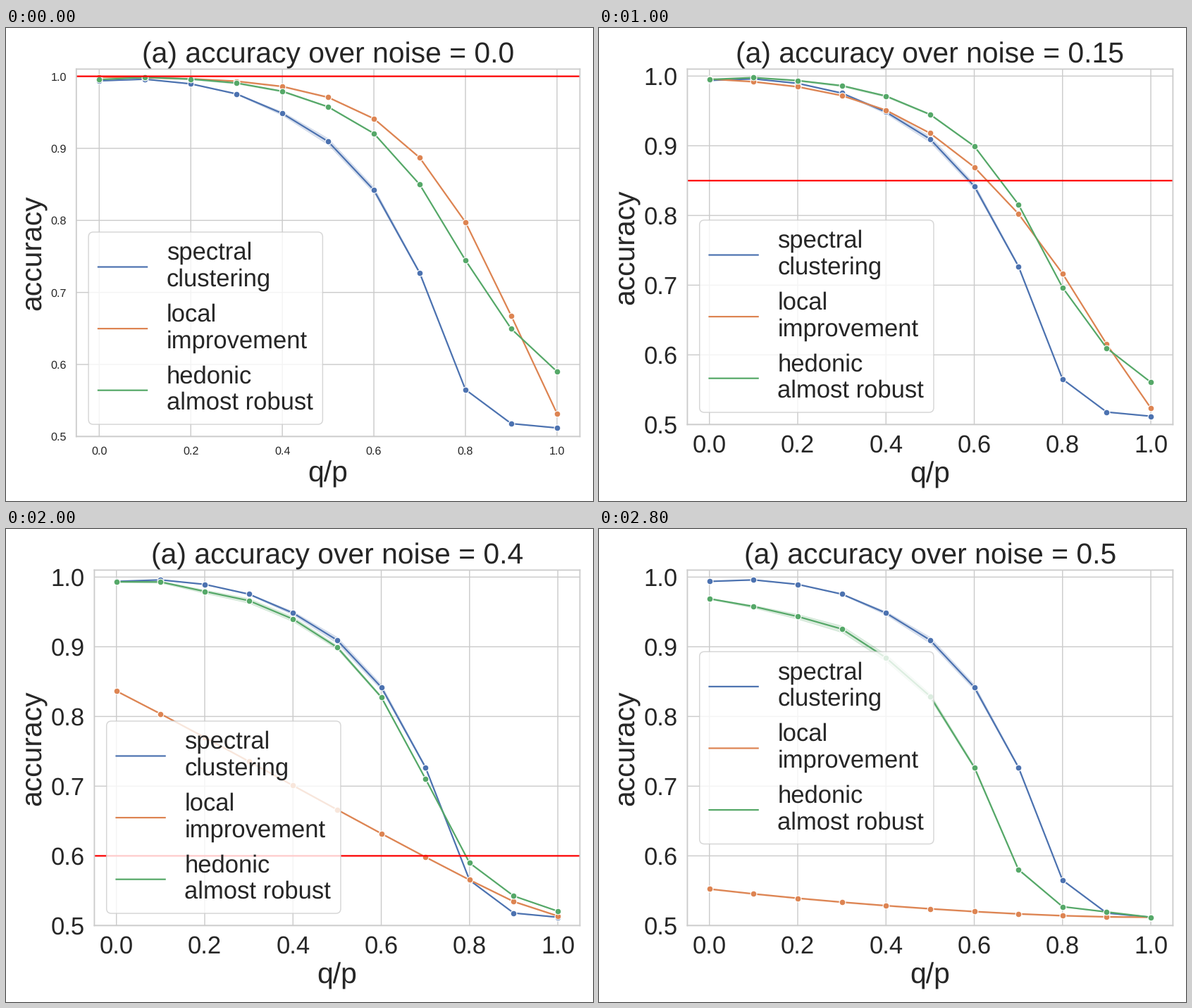
Animation, 833 px wide and 672 px high, one loop 3000 ms. Source, as a matplotlib script:

```python
import math

import numpy as np
import matplotlib.pyplot as plt
from matplotlib.animation import FuncAnimation
from matplotlib.lines import Line2D

W, H, DPI = 833, 672, 64
UNIT = 1.465 * 72 / DPI          # one design point in figure points
BIG, MEDIUM, SMALL = 27.9 * UNIT, 23.6 * UNIT, 11 * UNIT
BLUE, ORANGE, GREEN = "#4c72b0", "#dd8452", "#55a868"
INK, GREY = "0.15", "0.8"

NOISE = [0.0, 0.01, 0.025, *np.linspace(0.05, 0.45, 9), 0.475, 0.49, 0.5]
SHORT_LABELS_AT = 0.475
RATIO = np.linspace(0, 1, 11)

LONG = ["spectral\nclustering", "local\nimprovement", "hedonic\nalmost robust"]
SHORT = ["algorithm", "spectral", "local improv", "hedonic"]

plt.rcParams.update({
    "font.family": "Liberation Sans",
    "text.hinting": "none",
    "text.color": INK,
    "path.snap": False,
    "axes.labelcolor": INK,
    "axes.edgecolor": GREY,
    "axes.linewidth": 1.25 * UNIT,
    "axes.axisbelow": True,
    "axes.labelpad": 4 * UNIT,
    "axes.titlepad": 6 * UNIT,
    "grid.color": GREY,
    "grid.linewidth": UNIT,
    "patch.linewidth": UNIT,
})


# Accuracies are modelled as normal probabilities of a score z(q/p, noise).
@np.vectorize
def normal_cdf(z):
    return 0.5 * (1 + math.erf(z / math.sqrt(2)))


def profile(*points):
    """Score along q/p, linear between a few (q/p, z) points."""
    return np.interp(RATIO, *zip(*points))


SPECTRAL = profile((0, 2.5), (.1, 2.65), (.4, 1.63), (.5, 1.338), (.6, 1.003),
                   (.7, .604), (.8, .164), (.9, .045), (1, .03))
HEDONIC_CLEAN = profile((0, 2.61), (.1, 2.98), (.6, 1.41), (.7, 1.036),
                        (.8, .658), (.9, .384), (1, .228))
HEDONIC_NOISY = profile((0, 1.866), (.3, 1.443), (.5, .95), (.6, .604),
                        (.7, .203), (.8, .068), (1, .03))
FADE = profile((0, .1), (.2, .5), (.7, .5), (1, 1.34))


def local_score(signal):
    """Falls to zero at q/p = 1, bending more the weaker the signal."""
    peak = ((signal * (5.35 - 2.26 * signal)) ** 4 + 0.1285 ** 4) ** 0.25
    bend = 0.5 - 0.85 * signal - 0.15 * signal ** 4
    floor = 0.03 + 0.05 * signal ** 1.5
    return np.hypot(peak * (1 - RATIO) * (1 + RATIO) ** -bend, floor)


def hedonic_score(signal):
    weight = signal ** FADE * math.tanh(10 * signal) ** 1.5
    return HEDONIC_NOISY + weight * (HEDONIC_CLEAN - HEDONIC_NOISY)


def bell(center, width):
    return np.exp(-((RATIO - center) / width) ** 2)


def curve(score, color, spread):
    y = normal_cdf(score)
    ax.fill_between(RATIO, y - spread, y + spread, color=color, alpha=0.2,
                    linewidth=UNIT * 0.5)
    ax.plot(RATIO, y, color=color, lw=1.5 * UNIT, marker="o", ms=6 * UNIT,
            mec="white", mew=0.75 * UNIT)


def place_axes(left, bottom):
    top, right = 58.4, 814.4
    ax.set_position([left / W, 1 - bottom / H, (right - left) / W, (bottom - top) / H])


def add_legend(n):
    lines = [Line2D([], [], color=c, lw=1.5 * UNIT) for c in (BLUE, ORANGE, GREEN)]
    labels = LONG
    if n == SHORT_LABELS_AT:
        lines.insert(0, Line2D([], [], color="none"))
        labels = SHORT
    ax.legend(lines, labels, loc="center left" if n > 0.42 else "lower left",
              fontsize=MEDIUM, framealpha=0.8, edgecolor=GREY, facecolor="white")


def draw(i):
    n = NOISE[i]
    first = i == 0
    ax.clear()
    place_axes(*((99.8, 580.4) if first else (125.4, 563.4)))
    ax.set_xlim(-0.05, 1.05)
    ax.set_ylim(0.5, 1.01)
    ax.set_xticks(np.arange(6) / 5)
    ax.set_yticks(np.arange(5, 11) / 10)
    ax.tick_params(length=0, pad=9.5 * UNIT, labelcolor=INK,
                   labelsize=SMALL if first else MEDIUM)
    ax.grid(True)

    signal = 1 - 2 * n
    curve(SPECTRAL, BLUE, 0.0045 * bell(0.53, 0.17))
    curve(local_score(signal), ORANGE, 0.0008)
    curve(hedonic_score(signal), GREEN,
          (0.001 + 0.004 * (1 - signal) ** 2) * bell(0.36, 0.27))
    if n < 0.5:
        ax.axhline(1 - n, color="red", lw=1.5 * UNIT)

    ax.set_title(f"(a) accuracy over noise = {round(n, 2)}", fontsize=BIG)
    ax.set_xlabel("q/p", fontsize=BIG)
    ax.set_ylabel("accuracy", fontsize=BIG)
    add_legend(n)
    return []


fig = plt.figure(figsize=(W / DPI, H / DPI), dpi=DPI, facecolor="white")
ax = fig.add_axes([0.15, 0.16, 0.82, 0.75])
anim = FuncAnimation(fig, draw, frames=len(NOISE), interval=200,
                     init_func=lambda: draw(0), repeat=True)
plt.show()
```
